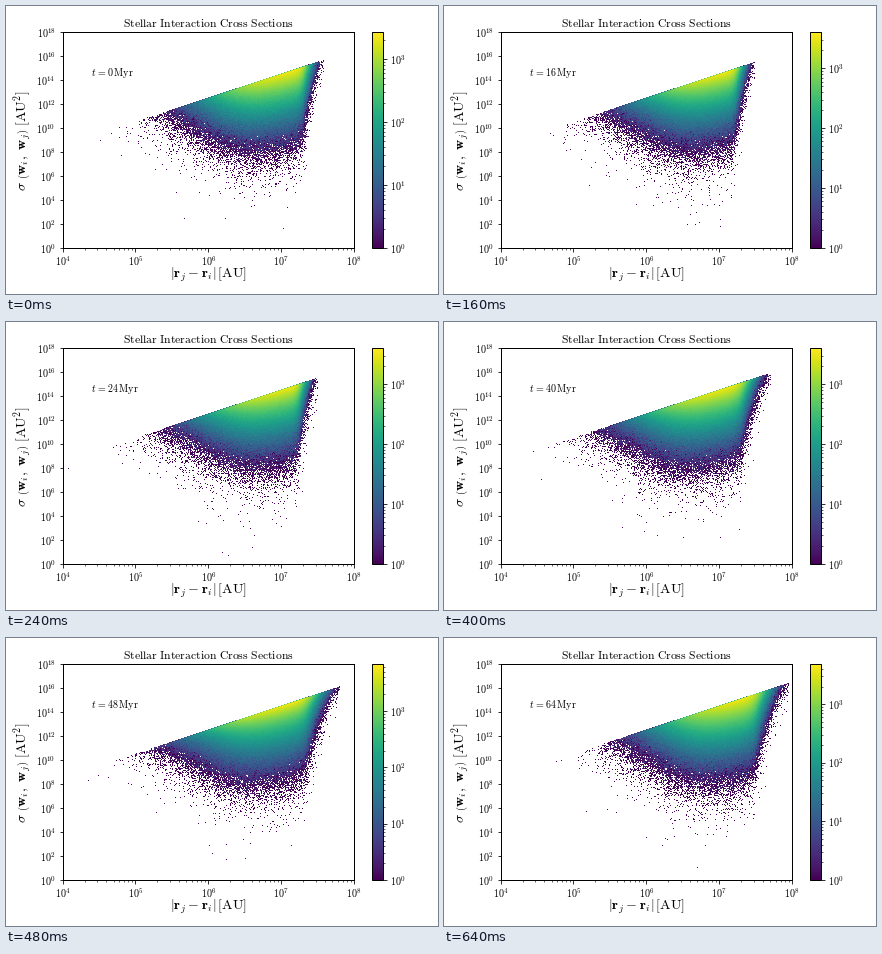
Write a matplotlib script that moves like this. It is 432 px wide and 288 px high and loops after 720 ms.

```python
import numpy as np
import matplotlib.pyplot as plt
from matplotlib.animation import FuncAnimation
from matplotlib.colors import LogNorm
from matplotlib.ticker import FuncFormatter

W, H, DPI = 432, 288, 72
FRAMES, INTERVAL, MYR_PER_FRAME = 9, 80, 8
X_BINS, Y_BINS = 292, 216

plt.rcParams.update({"mathtext.fontset": "cm", "font.size": 10, "axes.linewidth": 1.0})

# Density parameters over time (Myr), interpolated in between
KEY_TIMES = [0, 8, 24, 40, 48, 64]
PARAMS = {
    "level": [3.40, 3.40, 3.40, 3.42, 3.42, 3.60],    # log10 plateau count
    "peak": [3.43, 3.60, 3.60, 3.60, 3.834, 3.68],    # log10 colour maximum
    "knee": [6.47, 6.48, 6.48, 6.44, 6.44, 6.70],     # end of the rise, log10 AU
    "tip": [7.575, 7.47, 7.493, 7.70, 7.795, 7.945],  # largest separation, log10 AU
    "fall": [13.0, 14.0, 14.0, 9.0, 8.0, 8.5],        # steepness towards the tip
}

x_edges = np.linspace(4, 8, X_BINS + 1)
y_edges = np.linspace(0, 18, Y_BINS + 1)
x_mid = (x_edges[:-1] + x_edges[1:]) / 2
y_low = y_edges[:-1, None]
y_step = y_edges[1]


def soft_knee(t, width):
    return width * np.log10(1 + 10 ** (t / width))


def pair_counts(frame, p):
    """Noisy counts below the geometric limit sigma = pi r^2."""
    shoulder = p["tip"] - (p["level"] + 0.2) / p["fall"]
    ridge = (p["level"] - soft_knee(3 * (p["knee"] - x_mid), 1.7)
             - soft_knee(p["fall"] * (x_mid - shoulder), 1))
    slope = 0.5 + np.maximum(x_mid - shoulder, 0)
    limit = 2 * x_mid + np.log10(np.pi)
    cover = np.clip((limit - y_low) / y_step, 0, 1) * (x_mid < p["tip"] + 0.01)
    depth = np.maximum(limit - y_low - y_step / 2, 0)
    log_rate = ridge - slope * depth + (p["peak"] - p["level"]) * np.exp(-depth)
    counts = np.random.default_rng(frame + 11).poisson(cover * 10 ** log_rate)
    return np.ma.masked_less(counts, 1)


def params_at(time):
    return {name: np.interp(time, KEY_TIMES, vals) for name, vals in PARAMS.items()}


def box(left, top, right, bottom):
    return [left / W, 1 - bottom / H, (right - left) / W, (bottom - top) / H]


power = FuncFormatter(lambda v, _: f"$10^{{{round(np.log10(v))}}}$")

fig = plt.figure(figsize=(W / DPI, H / DPI), dpi=DPI, facecolor="white")
ax = fig.add_axes(box(56.6, 26.3, 348, 242))
cax = fig.add_axes(box(366.3, 26.3, 377.2, 242))

start = params_at(0)
mesh = ax.pcolormesh(10 ** x_edges, 10 ** y_edges, pair_counts(0, start),
                     cmap="viridis", norm=LogNorm(1, 10 ** start["peak"]))
ax.set(xscale="log", yscale="log", xlim=(1e4, 1e8), ylim=(1, 1e18))
ax.set_yticks(10.0 ** np.arange(0, 19, 2))
ax.minorticks_on()
ax.yaxis.minorticks_off()
ax.xaxis.set_major_formatter(power)
ax.yaxis.set_major_formatter(power)
fig.colorbar(mesh, cax=cax, format=power)

ax.set_title(r"$\mathrm{Stellar\ Interaction\ Cross\ Sections}$", fontsize=11.7, pad=5)
fig.text(202.2 / W, 1 - 268.5 / H, r"$|\mathbf{r}_j-\mathbf{r}_i|\,[\mathrm{AU}]$",
         fontsize=14, ha="center", va="center")
fig.text(17.5 / W, 1 - 135 / H,
         r"$\sigma\ \left(\mathbf{w}_i,\ \mathbf{w}_j\right)\ [\mathrm{AU}^2]$",
         fontsize=14, ha="center", va="center", rotation=90)
clock = fig.text(84.7 / W, 1 - 70 / H, "", fontsize=10)


def draw(frame):
    time = frame * MYR_PER_FRAME
    p = params_at(time)
    mesh.set_array(pair_counts(frame, p))
    mesh.set_clim(1, 10 ** p["peak"])
    clock.set_text(rf"$t\hspace{{0.08}}=\hspace{{0.08}}{time}\,\mathrm{{Myr}}$")
    return mesh, clock


anim = FuncAnimation(fig, draw, frames=FRAMES, interval=INTERVAL,
                     init_func=lambda: draw(0), repeat=True, repeat_delay=0)
plt.show()
```
